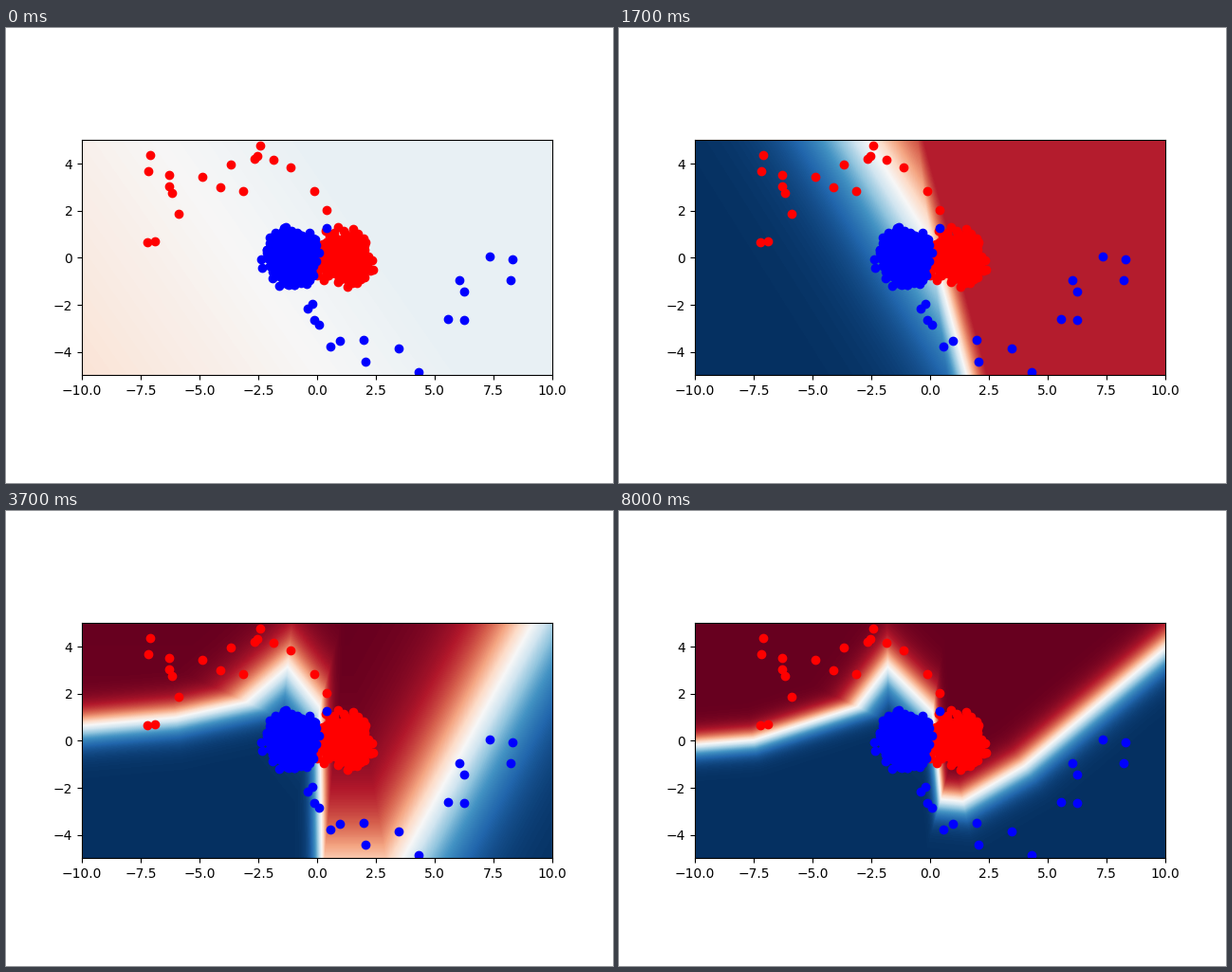
Write a matplotlib script that moves like this. It is 640 by 480 pixels and loops after 8100 ms.

```python
import numpy as np
import matplotlib.pyplot as plt
from matplotlib.animation import FuncAnimation

FRAMES, STEP = 81, 100
W, H = 496, 248
rng = np.random.default_rng(4)

X, Y = np.meshgrid((np.arange(W) + 0.5) / W * 20 - 10,
                   5 - (np.arange(H) + 0.5) / H * 10)


def edges(soft, *pts):
    """One plane per segment: positive on its left, soft units per logit."""
    return [((x1 - x0) * (Y - y0) - (y1 - y0) * (X - x0))
            / np.hypot(x1 - x0, y1 - y0) / soft
            for (x0, y0), (x1, y1) in zip(pts, pts[1:])]


def every(*planes):
    return np.minimum.reduce(np.broadcast_arrays(*planes))


def some(*planes):
    return np.maximum.reduce(np.broadcast_arrays(*planes))


def untrained():
    return some(-0.026 * X - 0.018 * Y - 0.08, -0.15)


def halves():
    return every(*edges(3.2, (0.6, 5), (-0.25, 1.5)),
                 *edges(1.6, (-0.25, 1.5), (1.15, -5)), 0.5)


def bent():
    return every(some(*edges(1.2, (-2.7, 5), (0, 0.7)),
                      *edges(0.4, (0, 0.7), (1.55, -5))), 2.1)


def hooked():
    left = every(*edges(0.6, (-10, 3.4), (-2.7, 2.15)),
                 *edges(1.1, (-2.7, 2.15), (-1.3, 2.85)))
    right = edges(1.1, (-1.3, 2.85), (0.1, 1.1))
    foot = edges(0.22, (0.1, 1.1), (0.77, -5))
    return every(some(left, *right, *foot), 2.55 - 0.02 * X)


def split():
    left = every(*edges(0.4, (-10, 0.6), (-6, 0.95), (-3, 1.6)),
                 *edges(0.6, (-3, 1.6), (-1.25, 3.1)))
    right = edges(0.6, (-1.25, 3.1), (0.1, 1.4))
    foot = edges(0.2, (0.1, 1.4), (0.2, -5))
    return every(some(left, *right, *foot), (Y + 6) / 1.8,
                 *edges(1.15, (3.65, -5), (9.2, 5)))


def settled(dip):
    left = every(*edges(0.28, (-10, -0.2), (-7.5, 0), (-3.1, 1.4)),
                 *edges(0.4, (-3.1, 1.4), (-1.8, 3.1)))
    right = edges(0.45, (-1.8, 3.1), (0.1, 1.2))
    foot = edges(0.14, (0.1, 1.2), (0.45, -2.4))
    bowl = edges(0.38, (0.4, -2.5 - dip), (1.4, -2.6 - dip),
                 (4, -1.1 - dip), (10, 3.9 + 0.4 * dip))
    return every(some(left, *right, *foot), *bowl)


# tick -> logit map
stages = {1: untrained(), 9: halves(), 17: bent(), 26: hooked(),
          37: split(), 62: settled(0.6), 80: settled(0)}
ticks = list(stages)
logits = [np.clip(s, -6, 6) for s in stages.values()]


def probability(tick):
    tick = max(tick, ticks[0])
    i = min(np.searchsorted(ticks, tick, side="right"), len(ticks) - 1)
    u = (tick - ticks[i - 1]) / (ticks[i] - ticks[i - 1])
    if i == 1:
        u **= 1.5
    elif i == 5:
        u = 1 - (1 - u) ** 2.5
    z = (1 - u) * logits[i - 1] + u * logits[i]
    return 1 / (1 + np.exp(-z))


def cluster(cx, n=420, spread=0.5, reach=1.38):
    pts = rng.normal(0, spread, (n, 2))
    return pts[np.hypot(*pts.T) < reach] + (cx, 0)


# the sparse spiral arms, from the centre outwards
red_arm = [(.40, 2.03), (-.12, 2.82), (-1.11, 3.85), (-1.85, 4.15),
           (-2.42, 4.77), (-2.56, 4.35), (-2.66, 4.21), (-3.15, 2.84),
           (-3.67, 3.95), (-4.11, 2.98), (-4.88, 3.46), (-6.29, 3.52),
           (-6.29, 3.04), (-6.17, 2.76), (-5.87, 1.87), (-7.10, 4.37),
           (-7.18, 3.67), (-7.20, .66), (-6.88, .70)]
blue_arm = [(.40, 1.25), (-.20, -1.96), (-.42, -2.16), (-.12, -2.66),
            (.08, -2.83), (.56, -3.77), (.95, -3.53), (1.96, -3.49),
            (2.04, -4.40), (3.45, -3.87), (4.33, -4.86), (5.58, -2.62),
            (6.25, -2.65), (6.23, -1.44), (6.03, -.97), (7.34, .04),
            (8.31, -.08), (8.23, -.97)]

fig, ax = plt.subplots(figsize=(6.4, 4.8), dpi=100)
img = ax.imshow(probability(0), cmap="RdBu_r", vmin=0, vmax=1,
                extent=(-10, 10, -5, 5))
for color, arm, cx in (("red", red_arm, 1.12), ("blue", blue_arm, -1.08)):
    ax.scatter(*np.vstack([arm, cluster(cx)]).T, c=color)
ax.set_xlim(-10, 10)
ax.set_ylim(-5, 5)


def update(tick):
    img.set_data(probability(tick))
    return [img]


anim = FuncAnimation(fig, update, frames=FRAMES, interval=STEP,
                     repeat=True, repeat_delay=0, blit=False)
plt.show()
```
